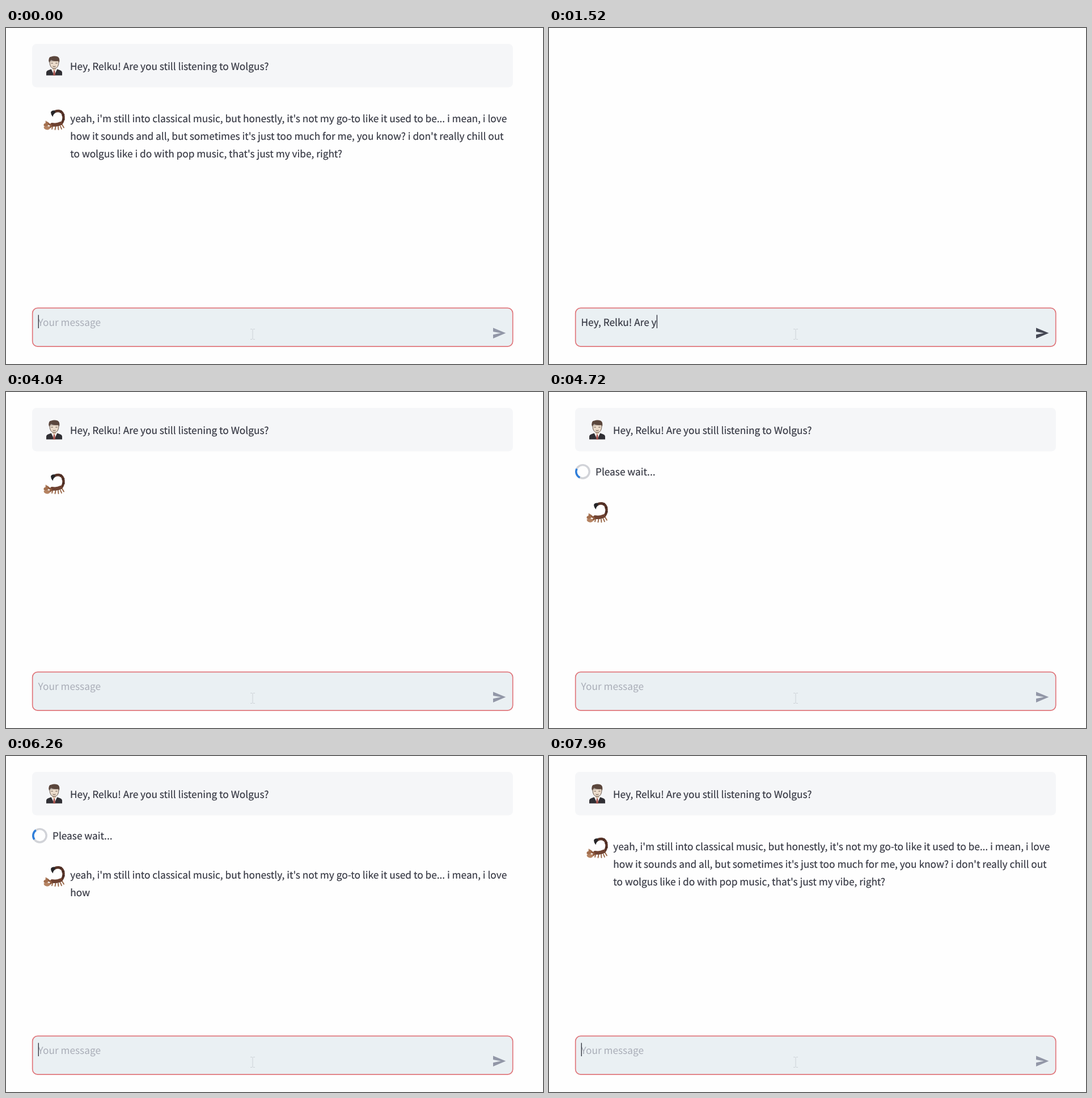
These frames come from a looping animation (947x592 px, 8860 ms). An HTML page:

```html
<!DOCTYPE html>
<html lang="en">
<head>
<meta charset="utf-8">
<title>Chat</title>
<style>
html, body { margin: 0; width: 100%; height: 100%; overflow: hidden; background: #fefefe; }
svg { display: block; width: 947px; height: 592px; }
text {
  font: 400 17.28px "Noto Sans CJK JP", "Noto Sans CJK SC", "Noto Sans CJK", "Noto Sans", sans-serif;
  fill: #363843; stroke: #363843; stroke-width: .2; white-space: pre; text-rendering: geometricPrecision;
}
#hint { fill: #a9adb7; stroke: none; }
</style>
</head>
<body>
<svg viewBox="0 0 947 592" xmlns="http://www.w3.org/2000/svg">
  <rect width="947" height="592" fill="#fefefe"/>

  <g id="user">
    <rect x="46" y="28" width="848" height="76.5" rx="8" fill="#f5f6f8"/>
    <g id="man">
      <path d="M71 83.500V79Q71 75.500 75 74.300L81 72H89L95 74.300Q99 75.500 99 79V83.500Z" fill="#302f34"/>
      <path d="M79.500 72L85 83.500L90.500 72Z" fill="#f4f1ef"/>
      <path d="M84 75H86L87 83.500H83Z" fill="#a8504a"/>
      <path d="M82 69H88V73L85 75.500L82 73Z" fill="#d8bda6"/>
      <path d="M77 58Q76.500 71 85 71.500Q93.500 71 93 58Z" fill="#ecdccb" stroke="#6a5a51" stroke-width="1"/>
      <path d="M76 61Q73.500 51 80 50.500Q85 48.500 91 50.500Q95.500 52.500 94 61L92.500 58Q84 59 79.500 56.500L77.500 58.500Z" fill="#5b463c"/>
      <path d="M79.500 62H82.700M87.300 62H90.500M82.500 67.500Q85 68.800 87.500 67.500" fill="none" stroke="#5c4b43"/>
    </g>
    <text x="113" y="73.800" id="sent"></text>
  </g>

  <g id="spinner">
    <circle cx="59.500" cy="140.300" r="11.700" fill="none" stroke="#d1d3d8" stroke-width="3.400"/>
    <path id="arc" d="M67.770 132.030A11.700 11.700 0 0 1 67.770 148.570" fill="none" stroke="#2f7fdb" stroke-width="3.400"/>
    <text x="82" y="147.300">Please wait...</text>
  </g>

  <g id="bot">
    <g id="scorpion" fill="none" stroke-linecap="round" stroke-linejoin="round">
      <path d="M82.500 173L81 178M87.500 174L86.500 179M92 174L92.500 179M96 173L98 178M99 170.500L102 175.500" stroke="#94603f" stroke-width="1.800"/>
      <path d="M80 171Q91 172.500 97.500 168.500Q102 163 101.500 156.500Q100.500 146.500 92 146Q88 146 85.500 148" stroke="#583428" stroke-width="4.400"/>
      <path d="M81 170Q90 171.500 96.500 168" stroke="#6f4231" stroke-width="6"/>
      <path d="M99.500 160.500L103.500 161M98.800 154L103 152.500M95.500 149L97.800 145.500" stroke="#35201d" stroke-width="1"/>
      <path d="M86.500 145.500Q80 144.500 79 149Q79.500 153.500 82.500 156.500Q83.500 152 86.500 149.500Z" fill="#262629"/>
      <path d="M79 171Q75 169.500 73 167M80 173Q77 176 73 176" stroke="#8d593d" stroke-width="3.200"/>
      <path d="M74 167L70 163L69.500 168Q66 168 66.500 172Q69 175.500 74.500 172Z" fill="#a36f4e"/>
      <path d="M75.500 173.500Q69 171.500 66.500 174.500Q67 179 73 179.500Q77.500 179 78 175Z" fill="#b58362"/>
    </g>
    <text x="113.300" y="166"></text>
    <text x="113.300" y="196.700"></text>
    <text x="113.300" y="227.500"></text>
  </g>

  <rect x="46.700" y="493.400" width="847" height="67.700" rx="9" fill="#eaf0f3" stroke="#e0777c" stroke-width="1.700"/>
  <text id="hint" x="56.600" y="524.500">Your message</text>
  <text id="typed" x="56.500" y="524.500" xml:space="preserve"></text>
  <rect id="caret" y="505.500" width="1.400" height="23.500" fill="#363843"/>
  <path id="send" d="M859 528.300L881.300 537.600L859 547V540.300L872.500 537.600L859 535Z"/>
  <path d="M431 530.500H434L435 531.500L436 530.500H439M435 531.500V547.500M431 548.500H434L435 547.500L436 548.500H439" fill="none" stroke="#cdd2d7"/>
</svg>

<script>
const LOOP = 8860;
const CLEAR = 20, SUBMIT = 3820, POSTED = 4020, BOT_IN = 4040, WAIT_IN = 4140, WAIT_OUT = 7520;
const MESSAGE = "Hey, Relku! Are you still listening to Wolgus?";
const REPLY = [
  "yeah, i'm still into classical music, but honestly, it's not my go-to like it used to be... i mean, i love",
  "how it sounds and all, but sometimes it's just too much for me, you know? i don't really chill out",
  "to wolgus like i do with pop music, that's just my vibe, right?"
].map(line => line.split(" "));

// [time, count] pairs
const TYPING = [[99, 0], [100, 1], [280, 3], [420, 4], [1100, 11], [1240, 12], [1520, 17], [2010, 27],
  [2130, 28], [2570, 36], [2710, 37], [3570, 45], [3720, 46]];
const STREAM = [[5680, 0], [5860, 7], [5940, 7], [6260, 22], [6840, 38], [6940, 38], [7400, 54]];
const CARET_OFF = [[SUBMIT, 4140], [4660, 5190], [5720, 6250]];

const $ = id => document.getElementById(id);
const show = (node, on) => node.setAttribute("visibility", on ? "visible" : "hidden");
const put = (node, value) => { if (node.textContent !== value) node.textContent = value; };
const lines = $("bot").querySelectorAll("text");

function countAt(keys, t) {
  if (t < keys[0][0]) return 0;
  for (let i = 1; i < keys.length; i++) {
    const [t0, n0] = keys[i - 1], [t1, n1] = keys[i];
    if (t < t1) return Math.floor(n0 + (n1 - n0) * (t - t0) / (t1 - t0) + 1e-6);
  }
  return keys[keys.length - 1][1];
}

function render(t) {
  const ended = t < CLEAR;
  const waiting = t >= WAIT_IN && t < WAIT_OUT;

  show($("user"), ended || t >= POSTED);
  show($("bot"), ended || t >= BOT_IN);
  show($("spinner"), waiting);
  $("bot").setAttribute("transform", `translate(0 ${waiting ? 50.3 : 0})`);
  $("arc").setAttribute("transform", `rotate(${45 + (t - 5560) * 360 / 500} 59.5 140.3)`);

  let words = ended ? Infinity : countAt(STREAM, t);
  REPLY.forEach((line, i) => {
    put(lines[i], line.slice(0, Math.max(0, words)).join(" "));
    words -= line.length;
  });

  const chars = t < SUBMIT ? countAt(TYPING, t) : 0;
  put($("typed"), MESSAGE.slice(0, chars));
  show($("hint"), !chars);
  $("send").setAttribute("fill", chars ? "#454854" : "#9297a7");
  $("caret").setAttribute("x", 56.6 + (chars ? $("typed").getComputedTextLength() : 0));
  show($("caret"), !CARET_OFF.some(([a, b]) => t >= a && t < b));
}

put($("sent"), MESSAGE);
function tick() {
  render(performance.now() % LOOP);
  requestAnimationFrame(tick);
}
tick();
</script>
</body>
</html>
```
